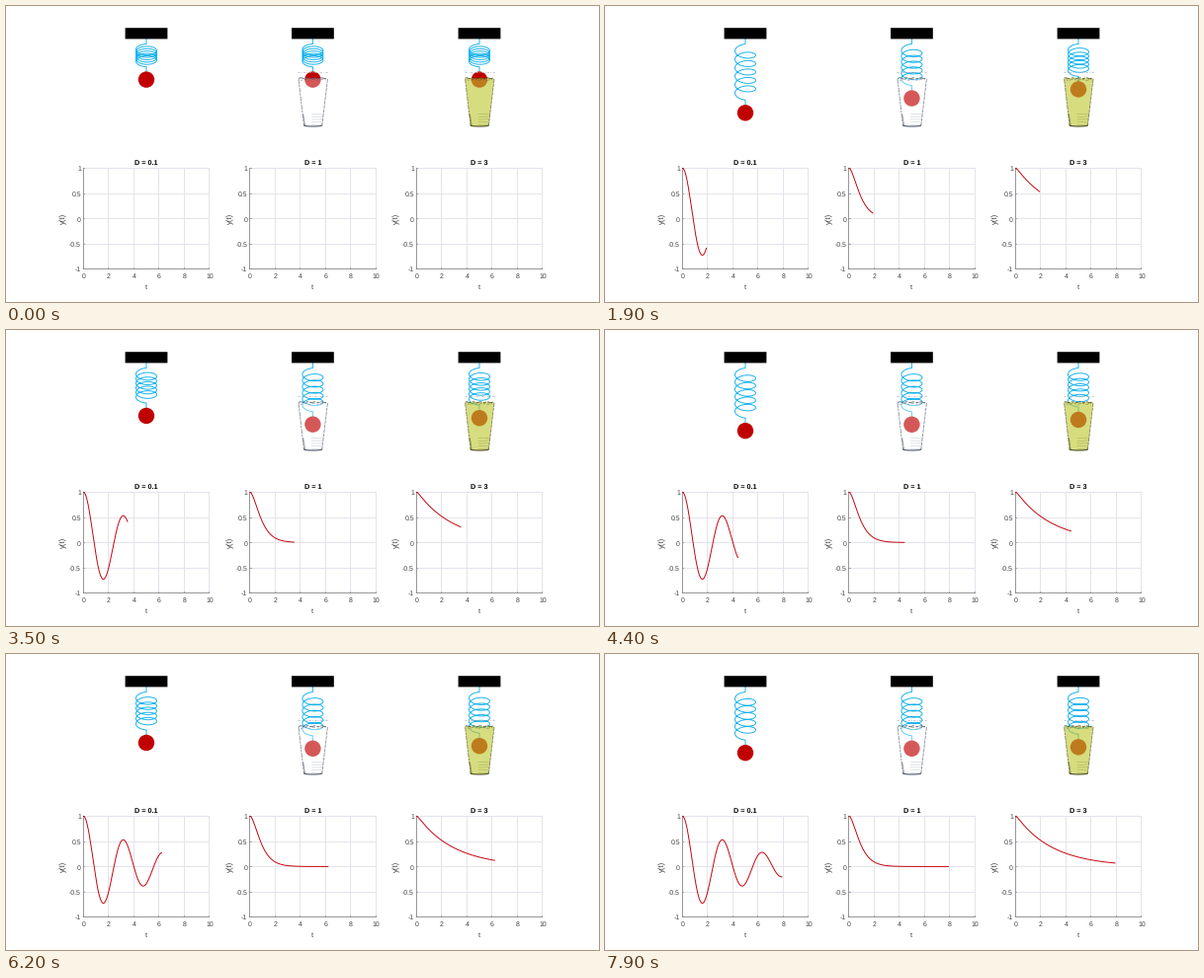
These frames come from a looping animation (600x300 px, 8000 ms). A matplotlib script:

```python
import numpy as np
import matplotlib.pyplot as plt
from matplotlib.animation import FuncAnimation
from matplotlib.patches import Circle, Polygon, Rectangle

W, H, DPI = 600, 300, 100
FRAMES, INTERVAL = 80, 100
PX = 72 / DPI  # points per pixel
OMEGA = 2.0
RED, BLUE, GRID, AXIS = "#c00000", "#16b2ee", "#e3e3ed", "#858585"
TOP, BOTTOM, SPAN = 164.4, 266.4, 127.4  # plot box

plt.rcParams["font.family"] = "Liberation Sans"
plt.rcParams["text.hinting"] = "none"
fig = plt.figure(figsize=(W / DPI, H / DPI), dpi=DPI, facecolor="white")
ax = fig.add_axes([0, 0, 1, 1])
ax.set_xlim(0, W)
ax.set_ylim(H, 0)
ax.axis("off")


def response(t, damping):
    """Free response of a damped oscillator released at rest from y = 1."""
    a = damping * OMEGA
    if damping < 1:
        w = OMEGA * np.sqrt(1 - damping**2)
        return np.exp(-a * t) * (np.cos(w * t) + a / w * np.sin(w * t))
    if damping == 1:
        return (1 + a * t) * np.exp(-a * t)
    w = OMEGA * np.sqrt(damping**2 - 1)
    s1, s2 = -a + w, -a - w
    return (s1 * np.exp(s2 * t) - s2 * np.exp(s1 * t)) / (s1 - s2)


def line(x, y, color, width=1.0, z=1, **kw):
    return ax.plot(x, y, color=color, lw=width * PX, zorder=z, **kw)[0]


def label(x, y, s, size, color="#404040", **kw):
    kw = {"ha": "center", "va": "center", **kw}
    ax.text(x, y, s, fontsize=size * PX, color=color, **kw)


def draw_plot(x0, damping):
    for k in range(6):
        x = x0 + SPAN * k / 5
        line([x, x], [TOP, BOTTOM], GRID)
        line([x, x], [BOTTOM, BOTTOM - 1.4], AXIS, 0.7, 2)
        label(x + 0.4, 274, str(2 * k), 6.9)
    for k in range(5):
        y = TOP + (BOTTOM - TOP) * k / 4
        line([x0, x0 + SPAN], [y, y], GRID)
        line([x0, x0 + 1.4], [y, y], AXIS, 0.7, 2)
        label(x0 - 2.2, y + 0.5, f"{1 - k / 2:g}".replace("\u2212", "-"), 6.9,
              ha="right", va="center_baseline")
    line([x0, x0, x0 + SPAN], [TOP, BOTTOM, BOTTOM], AXIS, 0.8, 2)
    mid = x0 + SPAN / 2 + 0.3
    label(mid, 158.8, f"D = {damping:g}", 7.3, "black", weight="bold")
    label(mid, 285, "t", 7.5)
    label(x0 - 19.5, 215, "y(t)", 7.8, rotation=90)


def draw_cup(cx, fill, alpha, ink):
    """Tapered tumbler laid translucently over the ball and spring."""
    left, right = cx - 14.4, cx + 15
    bl, br = cx - 9, cx + 9.4
    ax.add_patch(Polygon([(left, 73.3), (right, 73.3), (br, 122), (bl, 122)],
                         fc=fill, ec="none", alpha=alpha, zorder=6))
    # rim, rippled water surface and walls
    line([left - 1, right + 1], [67.3, 67.3], "#a9b0b8", 0.7, 7,
         dashes=(3, 2, 1, 2))
    x = np.linspace(left, right, 60)
    line(x, 73.2 + 0.4 * np.sin(0.9 * x), ink, 1.0, 7, alpha=0.8,
         dashes=(6, 1.5, 3, 1))
    line(x[4:-4], 74.8 + 0.5 * np.sin(0.7 * x[4:-4]), ink, 0.7, 7, alpha=0.55,
         dashes=(3, 2, 5, 2))
    line([left, bl], [74, 121], ink, 0.8, 7, alpha=0.7, dashes=(6, 1, 3, 1))
    line([right, br], [74, 121], ink, 0.8, 7, alpha=0.7, dashes=(5, 1, 4, 1))
    line([bl - 0.6, bl + 1.2], [110, 121.5], ink, 0.9, 7, alpha=0.6)
    # ridges and base
    for k in range(5):
        y = 109 + 2.7 * k
        line([cx - 1, cx + 6, br + 1 - 0.3 * k], [y + 0.6, y + 0.5, y],
             ink, 0.6, 7, alpha=0.28)
    u = np.linspace(0, np.pi, 30)
    line(cx + 0.2 - 9 * np.cos(u), 121 + np.sin(u), ink, 1.1, 7)


def spring_path(cx, ball_y, turns=5.5, r=10.5, depth=5):
    start, end = 38.5, ball_y - 13
    u = np.linspace(0, 1, 260)
    th = 2 * np.pi * turns * u
    x = cx - r * np.sin(th)
    y = start + depth * (1 - np.cos(th)) + (end - start - 2 * depth) * u
    return np.r_[cx, x, cx], np.r_[33, y, ball_y - 8]


class System:
    def __init__(self, x0, damping):
        self.x0, self.damping = x0, damping
        self.cx = x0 + 64
        draw_plot(x0, damping)
        ax.add_patch(Rectangle((self.cx - 21.4, 22.2), 42.8, 11.2, fc="black",
                               ec="none", zorder=5, snap=False))
        self.spring = line([], [], BLUE, 0.95, 3)
        self.ball = ax.add_patch(Circle((self.cx, 0), 8.2, fc=RED, ec="none",
                                        zorder=4))
        self.curve = line([], [], "#c40008", 0.95, 3)

    def update(self, now):
        t = np.linspace(0, now, 200)
        y = response(t, self.damping)
        mid, half = (TOP + BOTTOM) / 2, (BOTTOM - TOP) / 2
        self.curve.set_data(self.x0 + 0.4 + SPAN * t / 10, mid - half * y)
        ball_y = 95.8 - 21.2 * y[-1]
        self.ball.center = self.cx, ball_y
        self.spring.set_data(*spring_path(self.cx, ball_y))
        return self.curve, self.ball, self.spring


systems = [System(x0, d) for x0, d in ((78, 0.1), (246.4, 1), (415, 3))]
draw_cup(systems[1].cx, "white", 0.35, "#4c5666")
draw_cup(systems[2].cx, (190 / 255, 200 / 255, 48 / 255), 0.62, "#4a4c20")


def update(frame):
    return [artist for s in systems for artist in s.update(frame * 0.1)]


anim = FuncAnimation(fig, update, frames=FRAMES, interval=INTERVAL,
                     repeat=True, repeat_delay=0, blit=False)
plt.show()
```
